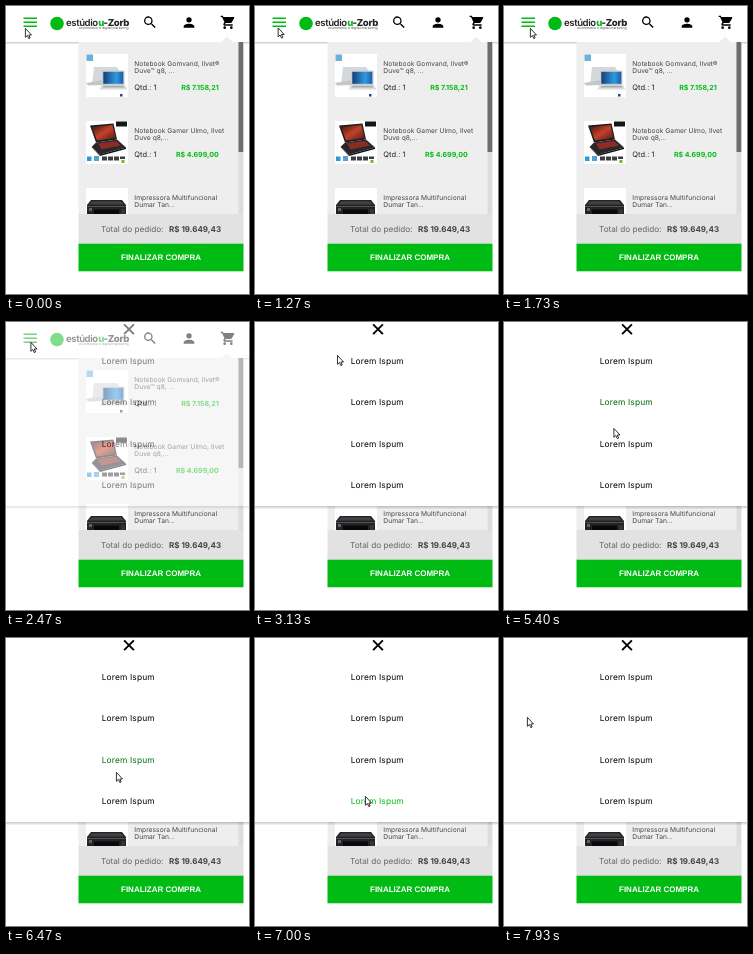
These frames come from a looping animation (243 px wide and 288 px high, 8 s). An HTML page:

```html
<!DOCTYPE html>
<html lang="pt-BR">
<head>
<meta charset="utf-8">
<title>Loja</title>
<style>
html, body { margin: 0; width: 100%; height: 100%; overflow: hidden; background: #fff; }
svg { display: block; width: 100vw; height: 100vh; }
text { font-family: Inter, "Open Sans", sans-serif; text-rendering: geometricPrecision; }
.name { font-size: 6.67px; fill: #444; letter-spacing: .05px; }
.qty { font-size: 7.5px; fill: #222; }
.price { font-size: 7.05px; font-weight: 700; fill: #00bb14; text-anchor: end; }
.total { font-size: 8.2px; fill: #666; }
.sum { font-size: 8px; font-weight: 700; fill: #444; }
.buy { font: 700 8px "Liberation Sans", Arial, sans-serif; fill: #fff; text-anchor: middle; }
.brand { font-size: 9.6px; font-weight: 600; fill: #222; letter-spacing: -.4px; }
.motto { font-size: 3.4px; fill: #444; }
.link { font-size: 8.4px; letter-spacing: .15px; }
</style>
</head>
<body>
<svg viewBox="0 0 243 288">
  <defs>
    <linearGradient id="shade" x2="0" y2="1">
      <stop stop-color="#000" stop-opacity=".22"/>
      <stop offset="1" stop-color="#000" stop-opacity="0"/>
    </linearGradient>
    <linearGradient id="sky" x2="1">
      <stop stop-color="#123f78"/>
      <stop offset=".65" stop-color="#2f9be0"/>
      <stop offset="1" stop-color="#1a5ca4"/>
    </linearGradient>
    <linearGradient id="fire" x2="1" y2="1">
      <stop stop-color="#3a1512"/>
      <stop offset=".5" stop-color="#c4412a"/>
      <stop offset="1" stop-color="#4a1a16"/>
    </linearGradient>
    <clipPath id="list"><path d="M72.500 36H237.500V208H72.500Z"/></clipPath>
  </defs>
  <rect width="243" height="288" fill="#fff"/>

  <!-- header -->
  <rect y="36" width="243" height="2.500" fill="url(#shade)"/>
  <path id="burger" d="M17.500 12.200H31M17.500 16.200H31M17.500 20.200H31" stroke="#00bb14" stroke-width="1.500"/>
  <circle cx="51" cy="17.500" r="6.800" fill="#00bb14"/>
  <text class="brand" x="60" y="19.800">estúdio<tspan dx=".5" font-weight="800"><tspan fill="#00bb14">u</tspan>-Zorb</tspan></text>
  <text class="motto" x="73" y="23.200">ecommerce e digital marketing</text>
  <g fill="#000">
    <path transform="translate(136 8.400) scale(.667)" d="M15.500 14h-.8l-.3-.3A6.500 6.500 0 1 0 13.700 14.400l.3.3v.8l5 5 1.500-1.500zM9.500 14a4.500 4.500 0 1 1 0-9 4.500 4.500 0 0 1 0 9z"/>
    <path transform="translate(175 8.500) scale(.667)" d="M12 12a4 4 0 1 0 0-8 4 4 0 0 0 0 8zm0 2c-2.700 0-8 1.300-8 4v2h16v-2c0-2.700-5.300-4-8-4z"/>
    <path transform="translate(214 8.300) scale(.667)" d="M7 18a2 2 0 1 0 0 4 2 2 0 0 0 0-4zM1 2v2h2l3.600 7.600-1.400 2.400C4.500 15.400 5.500 17 7 17h12v-2H7.400l1.100-2h7.500c.7 0 1.400-.4 1.700-1L21.300 5.500C21.600 4.800 21.200 4 20.400 4H5.200L4.300 2zM17 18a2 2 0 1 0 0 4 2 2 0 0 0 0-4z"/>
  </g>

  <!-- cart -->
  <path d="M215 36.500L221 30.500 227 36.500Z" fill="#eee"/>
  <g clip-path="url(#list)">
    <rect x="72" y="36" width="166" height="172" fill="#eee"/>
    <rect x="232.500" y="36" width="5" height="172" fill="#ddd"/>
    <rect x="232.500" y="36" width="5" height="110" fill="#6e6e6e"/>
    <g id="items"></g>
    <g>
      <rect x="80.500" y="48.500" width="6.500" height="6.500" fill="#6fb0d8"/>
      <path d="M88 61H111L113 64V79H86Z" fill="#d5d8db"/>
      <path d="M79.800 77L97 74 99 79 82 79.500Z" fill="#c3c7ca"/>
      <rect x="96" y="64.500" width="22.500" height="14.500" rx=".8" fill="#c9cdd0"/>
      <rect x="97.300" y="65.800" width="20" height="12" fill="url(#sky)"/>
      <path d="M95.500 79H119L121.500 83.500H93.500Z" fill="#d9dbdd"/>
      <path d="M97.500 79.800H117.500L118.500 81.500H96.500Z" fill="#a9aeb2"/>
      <rect x="114" y="88" width="2.500" height="2.500" fill="#24458f"/>
    </g>
    <g>
      <rect x="110" y="115.500" width="11" height="5" fill="#161616"/>
      <path d="M84 119.500L107.500 117.500 111 133.500 90 136.500Z" fill="#1c1c1e"/>
      <path d="M86 121L106.500 119 109.500 132 91 134.500Z" fill="url(#fire)"/>
      <path d="M90 136.500L111 133.500 120 141.500 94 148.500 85.500 141Z" fill="#29272a"/>
      <path d="M92 137.500L110 135 115 139.500 95.500 143.500Z" fill="#8a2d25"/>
      <path d="M85.500 141L94 148.500 120 141.500V143L94 150Z" fill="#111"/>
      <rect x="81" y="150.500" width="4.500" height="4.500" fill="#2c9bd8"/>
      <rect x="88" y="150" width="5" height="5" fill="#5b9fce"/>
      <path d="M96 150.500h5v4h-5zM102 150.500h5v4h-5zM108 150.500h5v4h-5zM114 150.500h5v2.500h-5z" fill="#3a3d42"/>
      <rect x="115.500" y="154" width="3" height="3" fill="#76b82a"/>
    </g>
    <g>
      <path d="M85 194H116L120 199V212H81V199Z" fill="#232325"/>
      <path d="M86 195.200H115L118 198.500H83Z" fill="#414144"/>
      <path d="M81 200.500H120" stroke="#66676a" stroke-width=".7"/>
      <path d="M88 203.500H113V209H88Z" fill="#08080a"/>
      <path d="M83 202h3v3h-3z" fill="#5a6470"/>
      <path d="M115 203h4v5h-4z" fill="#3c3032"/>
    </g>
  </g>
  <rect x="72.500" y="208" width="165" height="30" fill="#e2e2e2"/>
  <text class="total" x="95" y="226">Total do pedido:</text>
  <text class="sum" x="163" y="226">R$ 19.649,43</text>
  <rect x="72.500" y="237.700" width="165" height="27.600" fill="#00bb14"/>
  <text class="buy" x="155" y="254.300">FINALIZAR COMPRA</text>

  <!-- menu -->
  <g id="menu">
    <rect width="243" height="184" fill="#fff"/>
    <rect y="184" width="243" height="3.500" fill="url(#shade)"/>
    <path d="M118.100 2.400L127.900 12.200M127.900 2.400L118.100 12.200" stroke="#000" stroke-width="1.900"/>
  </g>
  <path id="cursor" d="M.4 .4V9.300L2.400 7.500 3.800 10.600 5.100 10 3.800 7H6.500Z" fill="#fff" stroke="#000" stroke-width=".8"/>
</svg>
<script>
const LOOP = 8000, STEP = 200 / 3, FADE = 300;
const $ = id => document.getElementById(id);
const clamp = v => Math.min(1, Math.max(0, v));

function addText(parent, cls, x, y, str) {
  const el = document.createElementNS("http://www.w3.org/2000/svg", "text");
  el.setAttribute("class", cls);
  el.setAttribute("x", x);
  el.setAttribute("y", y);
  el.textContent = str;
  parent.appendChild(el);
  return el;
}

const products = [
  ["Notebook Gomvand, Ilvet®", "Duve™ q8, ...", "R$ 7.158,21"],
  ["Notebook Gamer Ulmo, Ilvet", "Duve q8,...", "R$ 4.699,00"],
  ["Impressora Multifuncional", "Dumar Tan...", ""]
];
products.forEach(([first, second, price], i) => {
  const y = 48 + 67 * i, box = $("items");
  box.insertAdjacentHTML("beforeend", `<rect x="80" y="${y}" width="42" height="43" fill="#fff"/>`);
  addText(box, "name", 128.3, y + 11.9, first);
  addText(box, "name", 128.3, y + 19.4, second);
  if (price) {
    addText(box, "qty", 128.3, y + 35.7, "Qtd.: 1");
    addText(box, "price", 212.7, y + 35.7, price);
  }
});

// hover start and end of each menu link
const hovers = [[3167, 4000], [4267, 5267], [5433, 6350], [6633, 7567]];
const links = hovers.map((_, i) => addText($("menu"), "link", 95.7, 41.8 + 41.5 * i, "Lorem Ispum"));

// pointer path: time, x, y
const path = [
  [267, 19, 22], [400, 21, 16], [1200, 21, 16], [1467, 28, 38], [1733, 26, 22],
  [1867, 26, 22], [2000, 24.5, 20], [2867, 24.5, 20], [3000, 50, 24], [3133, 82, 33],
  [3200, 100, 34.5], [3267, 105, 35], [3867, 105, 35], [4200, 107, 70], [4267, 108, 75],
  [5133, 108, 75], [5400, 109.5, 106], [5467, 110, 117], [6200, 110, 117],
  [6467, 110, 134], [6667, 110, 158], [7467, 110, 158], [7667, 70, 118], [7933, 23, 79]
];

function pointerAt(t) {
  const i = path.findIndex(p => p[0] > t);
  if (i < 0) return path[path.length - 1].slice(1);
  if (i === 0) return path[0].slice(1);
  const [t0, x0, y0] = path[i - 1], [t1, x1, y1] = path[i];
  const k = (t - t0) / (t1 - t0);
  return [x0 + (x1 - x0) * k, y0 + (y1 - y0) * k];
}

function draw(time) {
  // the picture advances at 15 steps per second
  const t = Math.floor((time % LOOP + 4) / STEP) * STEP;
  $("cursor").setAttribute("transform", `translate(${pointerAt(t)})`);
  $("burger").setAttribute("stroke", t > 2260 ? "#00a012" : "#00bb14");
  $("menu").setAttribute("opacity", clamp((t - 2400) / 133));
  hovers.forEach(([on, off], i) => {
    const k = clamp((t - on) / FADE) - clamp((t - off) / FADE);
    links[i].setAttribute("fill", `rgb(0,${Math.round(187 * k)},${Math.round(20 * k)})`);
  });
}

const start = performance.now();
function tick() {
  draw(performance.now() - start);
  requestAnimationFrame(tick);
}
draw(0);
requestAnimationFrame(tick);
</script>
</body>
</html>
```
